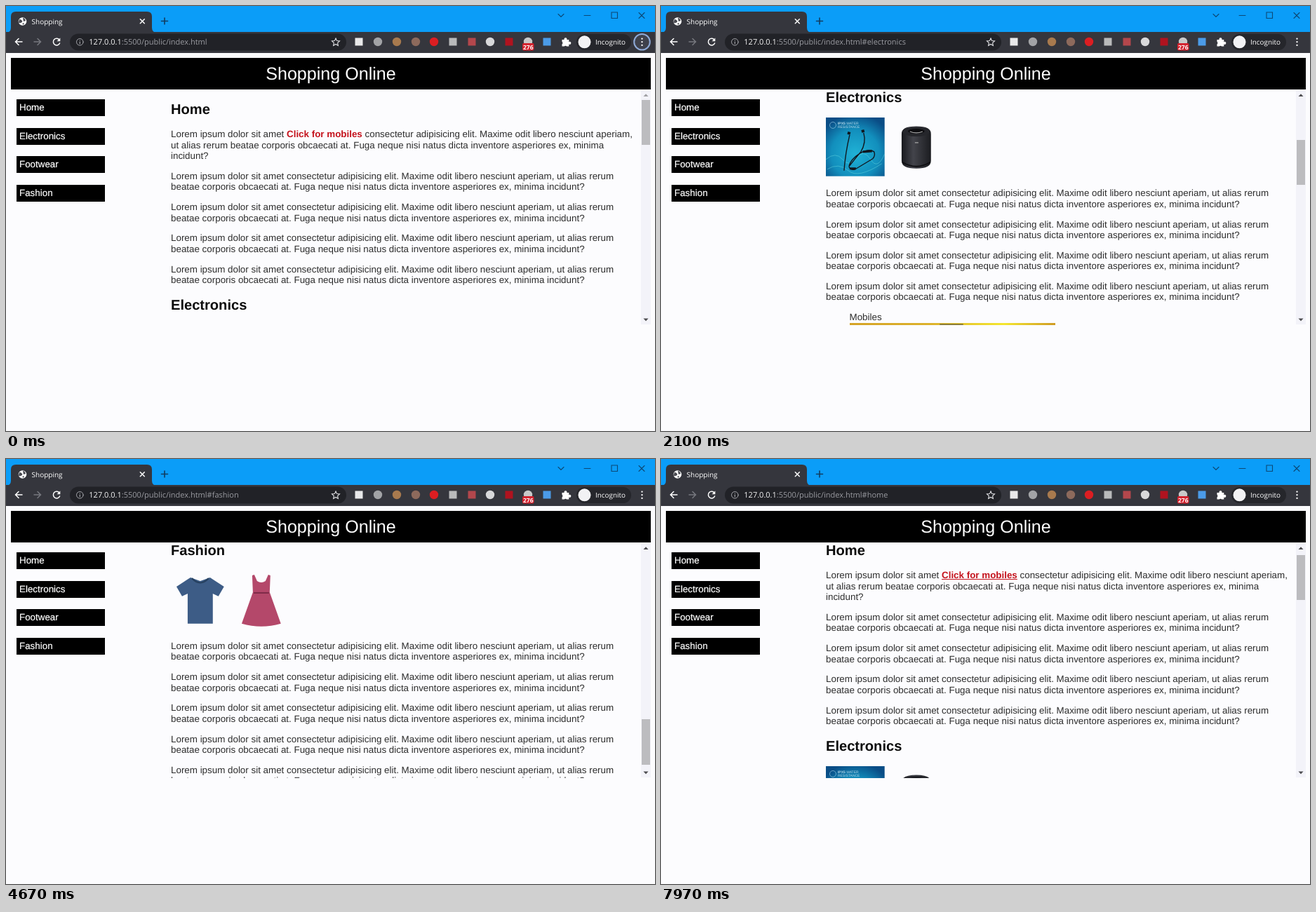
Animation, 925 px wide and 606 px high, one loop 8000 ms. Source, as an HTML page:

```html
<!DOCTYPE html>
<html lang="en">
<head>
<meta charset="utf-8">
<title>Shopping</title>
<style>
html, body { margin: 0; width: 100%; height: 100%; overflow: hidden; background: #fcfcfe; }
body { position: relative; font: 13.395px/15.4px "Liberation Sans", Arial, sans-serif; color: #2d2d2d; text-rendering: geometricPrecision; }
#browser { position: absolute; left: 0; top: 0; }
#browser text { font-family: "Open Sans", "Noto Sans", sans-serif; }
header { position: absolute; left: 7px; top: 74px; width: 912px; height: 45px; background: #000; color: #fff; font-size: 25.1px; line-height: 47px; text-align: center; }
nav a { position: absolute; left: 15px; width: 122px; height: 24px; padding-left: 4px; background: #000; color: #fff; line-height: 24px; -webkit-text-stroke: .2px; }
.hover { text-decoration: underline; }
#view { position: absolute; left: 235px; top: 119px; width: 670px; height: 336px; overflow: hidden; }
#content { position: relative; display: flow-root; white-space: nowrap; }
h2 { margin: 16.7px 0; font-size: 20.1px; line-height: 23.1px; color: #0c0c0c; }
h2 span { position: relative; top: 1px; }
p { margin: 13.4px 0; }
#link { color: #c4121c; font-weight: bold; }
.pics { height: 87px; }
.pics svg { position: absolute; }
.pics svg + svg { left: 87.4px; }
figure { margin: 13.4px 33.5px 16.7px; }
figure svg { display: block; margin-bottom: 3px; }
#bar { position: absolute; left: 905px; top: 121px; width: 13.5px; height: 333px; background: #f3f3f9; }
#thumb { position: absolute; left: 1px; width: 11.5px; height: 64.5px; background: #bcbcbf; }
#bar svg { position: absolute; left: 0; top: 0; }
</style>
</head>
<body>
<svg id="browser" width="925" height="67" fill="none" stroke-linecap="round">
  <rect width="925" height="38" fill="#0b9df8"/>
  <path d="M0 37H925V67H0zM1 38Q7 37 7 31V15Q7 8 14 8H201Q208 8 208 15V31Q208 37 214 38z" fill="#35363d"/>
  <rect x="91" y="39.5" width="394" height="24" rx="12" fill="#212227"/>
  <g stroke="#0d4876" stroke-width="1.1">
    <path d="M787 11.5l4 4 4-4M824 13.5h9M863 9h8.5v8.5H863zM902 9.5l8 8M910 9.5l-8 8"/>
  </g>
  <circle cx="23.5" cy="22" r="5.8" fill="#fff"/>
  <path d="M19 19q3 0 4 2t-2 3-3-1zM24 17q3 0 4 4l-3 1zM23 25l3-1-1 3z" fill="#4a4b52"/>
  <text x="36.5" y="25.6" font-size="10" fill="#fff">Shopping</text>
  <path d="M191.3 18.8l6 6M197.3 18.8l-6 6" stroke="#fff" stroke-width="1.5"/>
  <path d="M221.5 21.5h9M226 17v9" stroke="#123d60" stroke-width="1.6"/>
  <path d="M23 51H14M18 46.5L13.5 51l4.5 4.5" stroke="#fff" stroke-width="1.5"/>
  <path d="M40 51h9M45 46.5l4.5 4.5-4.5 4.5" stroke="#77787f" stroke-width="1.5"/>
  <path d="M76 48.2A4.8 4.8 0 1 0 76.6 53" stroke="#fff" stroke-width="1.5"/>
  <path d="M77.3 45.5v4.7h-4.7z" fill="#fff"/>
  <circle cx="105.3" cy="51.3" r="4.8" stroke="#a4a5aa"/>
  <path d="M105.3 51v2.7M105.3 48.8v.1" stroke="#a4a5aa" stroke-width="1.2"/>
  <text x="118.3" y="55.4" font-size="11" fill="#f4f4f4">127.0.0.1<tspan fill="#9a9ba1">:5500/public/index.html<tspan id="hash"></tspan></tspan></text>
  <path d="M470 46l1.6 3.6 3.9.4-2.9 2.6.8 3.9-3.4-2-3.4 2 .8-3.9-2.9-2.6 3.9-.4z" stroke="#e3e3e6" stroke-width="1.1"/>
  <g id="extensions"></g>
  <rect x="736" y="53" width="16.5" height="10.5" rx="2" fill="#d3202c"/>
  <text x="744.3" y="61.6" font-size="8.5" font-weight="700" fill="#fff" text-anchor="middle">276</text>
  <path d="M792.5 48h3.2a2 2 0 1 1 3.6 0h3v3.2a2 2 0 1 1 0 3.4v3h-3.2a2 2 0 0 0-3.4 0h-3.2v-3.2a2 2 0 0 0 0-3.4z" fill="#fff"/>
  <rect x="813" y="40" width="78" height="23" rx="11.5" fill="#25262b"/>
  <circle cx="824.5" cy="51.3" r="9" fill="#f2f2f4"/>
  <text x="840" y="55" font-size="9.9" fill="#fff">Incognito</text>
  <circle id="ring" cx="906.5" cy="51.3" r="11.3" fill="#3f414b" stroke="#8ea9d6" stroke-width="2"/>
  <path d="M906.5 46.6v.1M906.5 51.2v.1M906.5 55.8v.1" stroke="#fff" stroke-width="2.3"/>
</svg>

<header>Shopping Online</header>
<nav id="nav"></nav>
<div id="view"><div id="content"></div></div>
<div id="bar">
  <div id="thumb"></div>
  <svg width="14" height="333"><path id="up" d="M3.5 8L7 4.3 10.5 8z"/><path d="M3.5 324.5L7 328.2l3.5-3.7z" fill="#4b4b4f"/></svg>
</div>

<script>
const $ = id => document.getElementById(id);
const names = ["Home", "Electronics", "Footwear", "Fashion"];

// Toolbar extensions: [centre x, colour, round?]
$("extensions").innerHTML = [
  [503, "#e9e9ea", 0], [530, "#a2a3a6", 1], [557, "#a87a4e", 1], [584, "#8d6a5c", 1],
  [610, "#dc1e22", 1], [637, "#b9babb", 0], [664, "#b3474c", 0], [690, "#d8d8da", 1],
  [717, "#b0131f", 0], [744, "#c9c9c9", 1], [771, "#4b9be8", 0]
].map(([x, fill, round]) => round
  ? `<circle cx="${x}" cy="51" r="6.2" fill="${fill}"/>`
  : `<rect x="${x - 5.5}" y="45.5" width="11" height="11" fill="${fill}"/>`).join("");

const pic = body => `<svg width="83.7" height="83.7" viewBox="0 0 84 84" fill="none">${body}</svg>`;

const earphones = pic(`
  <defs><radialGradient id="teal" cy=".62" r=".68">
    <stop stop-color="#20b2d6"/><stop offset=".6" stop-color="#128fbd"/><stop offset="1" stop-color="#0a4d86"/>
  </radialGradient></defs>
  <rect width="84" height="84" fill="url(#teal)"/>
  <path d="M0 60q14-12 24 0t20-2 20 2 20-8M2 74q16-10 30 2t48-10" stroke="#5fd2dc" stroke-opacity=".55"/>
  <circle cx="10" cy="11" r="4.5" stroke="#8fc6df" stroke-width=".7"/>
  <text x="17" y="10" font-size="5" font-weight="700" fill="#b9dcec">IPX5 <tspan font-weight="400">WATER</tspan></text>
  <text x="17" y="15.5" font-size="5" fill="#b9dcec">RESISTANCE</text>
  <path d="M34 25Q28 50 26 76M54 22q4 14-4 27L33 70M33 70q2 6 9 4l25-15q4-4 2-10-7-5-20 2-14 9-16 19" stroke="#101820" stroke-width="1.4"/>
  <path d="M34 73l9 0M53 49l13-1" stroke="#101820" stroke-width="3.2"/>
  <path d="M31 22l4 1M51 20l4-1" stroke="#101820" stroke-width="4"/>`);

const speaker = pic(`
  <defs><linearGradient id="can"><stop stop-color="#17181c"/><stop offset=".4" stop-color="#43444b"/><stop offset="1" stop-color="#1b1c20"/></linearGradient></defs>
  <path d="M21 24Q20 12.5 42 12.5T63 24V62Q63 73 42 73T21 62z" fill="url(#can)"/>
  <ellipse cx="42" cy="20.5" rx="19" ry="6.7" fill="#25262b"/>
  <ellipse cx="42" cy="19.5" rx="12" ry="3.5" fill="#0d0d10"/>
  <path d="M33 20q9 4 18 0M40 36h5" stroke="#aaa" stroke-width="1.2"/>
  <path d="M22 64q20 12 40 0" stroke="#0e0e11" stroke-width="2"/>`);

const brogues = pic(`
  <defs><linearGradient id="leather" x2=".8" y2="1"><stop stop-color="#5c3c28"/><stop offset=".55" stop-color="#98694a"/><stop offset="1" stop-color="#5f3d2a"/></linearGradient></defs>
  <path d="M3 80Q1 72 9 61L20 40 37 12Q45 2 53 4q5 8 7 24L50 45 30 69Q16 84 3 80z" fill="url(#leather)"/>
  <path d="M4 81q15 0 25-10l20-25" stroke="#2e1c13" stroke-width="2"/>
  <path d="M43 9q6-6 10-4l6 19-10 8z" fill="#3c281c"/>
  <path d="M46 38q9-8 22-6 10 8 12 24 3 17 0 23-8 5-18-3L46 62l-9 14h-4l5-17z" fill="url(#leather)"/>
  <path d="M37 62v14h-4M45 63q10 14 21 17 9 2 14-1" stroke="#2e1c13" stroke-width="2"/>
  <path d="M9 62q9 0 16 8M24 35q11 3 17 17M70 40q-9 6-8 18 7 8 17 2" stroke="#4a2d1d" stroke-width="1.3"/>
  <path d="M31 24l8 7M27 30l9 7M23 36l9 7M20 42l8 6M55 45l11 4M56 51l10 4" stroke="#26170f" stroke-width="2"/>
  <path d="M12 66q5 0 8 4M70 66q4 4 8 2" stroke="#c79a77" stroke-width="1.6"/>`);

const heels = pic(`
  <rect y="2" width="84" height="81" fill="#ebe5e0"/>
  <path d="M0 2H84V26L44 20 0 34z" fill="#ddd6d0"/>
  <path d="M0 68l34-12 50 6v21H0z" fill="#f3eeec"/>
  <path d="M46 16q5-5 8-1 4 24 18 36 6 6 6 15-9 4-20-8Q52 38 49 36l2 20h-2z" fill="#b81826"/>
  <path d="M54 18q5 22 14 32-11-8-17-26z" fill="#e9b7a9"/>
  <path d="M12 25q4-7 9-1 7 24 26 32 14 7 18 15-15 6-30-4Q25 46 16 38l1 35h-2z" fill="#d71a2c"/>
  <path d="M20 25q7 20 25 31-19-6-28-26z" fill="#efc3b5"/>
  <path d="M47 57l10-6 7 8-6 8-11-3zM64 52l9-3 4 9-8 6z" fill="#b4b6c2"/>
  <path d="M49 58l12 4M55 53l3 12M67 54l7 5" stroke="#f5f5fa"/>`);

const shirt = pic(`
  <path d="M28 10l14 5 14-5 20 13-8 14-8-4v43H24V33l-8 4-8-14z" fill="#3d5c86"/>
  <path d="M30 11q12 13 24 0" stroke="#26405f" stroke-width="2"/>`);

const dress = pic(`
  <path d="M32 6l4 9q6 4 12 0l4-9 3 1-1 24 16 45q-28 8-56 0l16-45-1-24z" fill="#b4486a"/>
  <path d="M31 32h22" stroke="#7c2a47" stroke-width="2"/>`);

const phones = `<svg width="293" height="224">
  <defs><linearGradient id="gold"><stop stop-color="#d5a326"/><stop offset=".4" stop-color="#dcb22c"/><stop offset=".75" stop-color="#f4e62f"/><stop offset="1" stop-color="#cf9c24"/></linearGradient></defs>
  <rect width="293" height="224" fill="url(#gold)"/>
  <rect x="128" y="1" width="34" height="2" rx="1" fill="#8d7f3a"/>
  <rect x="85" y="24" width="54" height="176" rx="7" fill="#24272d"/>
  <rect x="152" y="24" width="54" height="176" rx="7" fill="#3b3f48"/>
</svg>`;

const opening = "Lorem ipsum dolor sit amet";
const middle = "consectetur adipisicing elit. Maxime odit libero nesciunt aperiam,";
const ending = "beatae corporis obcaecati at. Fuga neque nisi natus dicta inventore asperiores ex, minima";
const paragraphs = n => `<p>${opening} ${middle} ut alias rerum<br>${ending} incidunt?</p>`.repeat(n);
const pics = (a, b) => `<div class="pics">${a}${b}</div>`;

const bodies = [
  `<p>${opening} <span id="link">Click for mobiles</span> ${middle}<br>ut alias rerum ${ending}<br>incidunt?</p>` + paragraphs(4),
  pics(earphones, speaker) + paragraphs(4) + `<figure>Mobiles${phones}</figure>`,
  pics(brogues, heels) + paragraphs(5),
  pics(shirt, dress) + paragraphs(5)
];
$("content").innerHTML = names.map((name, i) => `<h2><span>${name}</span></h2>${bodies[i]}`).join("");
$("nav").innerHTML = names.map((name, i) => `<a style="top:${Math.round(133 + i * 40.7)}px">${name}</a>`).join("");

const headings = [...document.querySelectorAll("h2")];
const links = [...document.querySelectorAll("nav a"), $("link")];
const LINK = 4;

// [time, index] pairs: -1 means nothing
const visits = [[0, -1], [850, 0], [1700, 1], [2950, 2], [4050, 3], [5250, 0], [6300, 1], [7400, 0]];
const hovers = [[0, -1], [500, 0], [1150, 1], [1950, -1], [2550, 2], [3400, 3], [4400, -1], [4900, 0],
  [5800, -1], [6000, 1], [6600, -1], [7100, 0], [7600, -1], [7750, LINK]];
const at = (track, t) => track.filter(([start]) => start <= t).pop()[1];

function draw(now) {
  const t = now % 8000;
  const section = at(visits, t), hovered = at(hovers, t);
  const scroll = section < 0 ? 0 : headings[section].offsetTop;
  $("hash").textContent = section < 0 ? "" : "#" + names[section].toLowerCase();
  $("ring").style.display = section < 0 ? "" : "none";
  $("content").style.transform = `translateY(${-scroll}px)`;
  $("thumb").style.top = 12.7 + scroll * 0.1925 + "px";
  $("up").setAttribute("fill", scroll ? "#4b4b4f" : "#a0a0a4");
  links.forEach((link, i) => link.classList.toggle("hover", i === hovered));
  requestAnimationFrame(draw);
}
draw(0);
</script>
</body>
</html>
```
